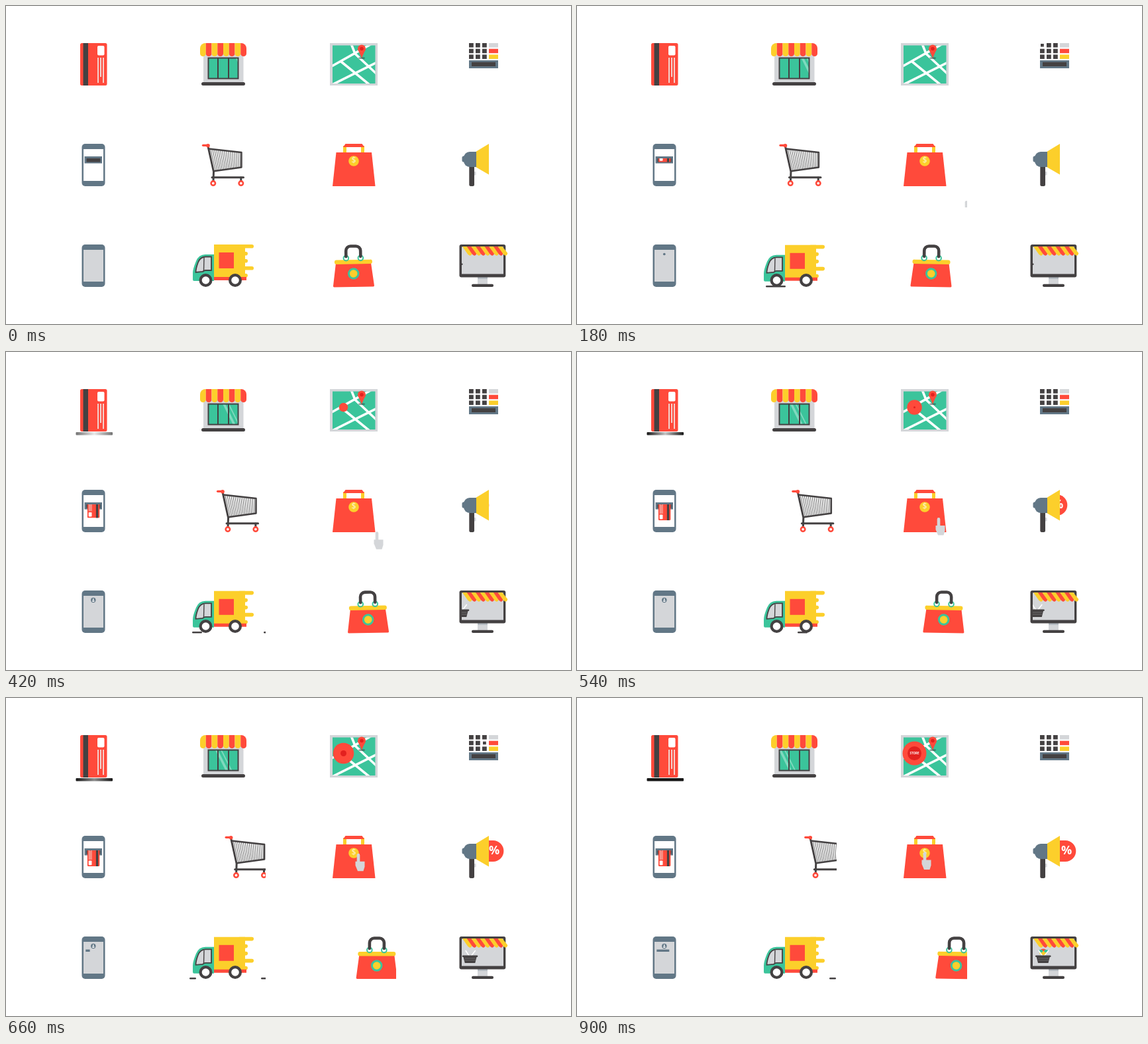
Animation of 853x480 px, one loop 0.96 s. Source, as an HTML page with a canvas:

```html
<!DOCTYPE html>
<html lang="en">
<head>
<meta charset="utf-8">
<title>Shopping icons</title>
<style>
  html, body { margin: 0; width: 100%; height: 100%; overflow: hidden; background: #fff; }
  canvas { display: block; }
</style>
</head>
<body>
<canvas id="stage" width="853" height="480"></canvas>
<script>
const ctx = document.getElementById('stage').getContext('2d');
const RED = '#ff4a3b', YELLOW = '#fccf2b', DARK = '#444142', SLATE = '#627786',
      GRAY = '#d4d6d9', GREEN = '#3bc49b', WHITE = '#fff', CRIMSON = '#e3211f';
const STEP = 60, STEPS = 16;
const DRIFT = 3.15; // rightward pixels per step of cart and handbag

// Progress 0..1 between two steps, and its smooth version
const ramp = (k, from, to) => Math.min(1, Math.max(0, (k - from) / (to - from)));
const ease = u => u * u * (3 - 2 * u);

function fill(color) { ctx.fillStyle = color; ctx.fill(); }

function stroke(color, width) {
  ctx.strokeStyle = color;
  ctx.lineWidth = width;
  ctx.stroke();
}

function box(color, x1, y1, x2, y2, r = 0) {
  ctx.beginPath();
  ctx.roundRect(x1, y1, x2 - x1, y2 - y1, r);
  fill(color);
}

function path(points) {
  ctx.beginPath();
  for (let i = 0; i < points.length; i += 2) ctx.lineTo(points[i], points[i + 1]);
}

function poly(color, ...points) { path(points); fill(color); }
function line(color, width, ...points) { path(points); stroke(color, width); }

function disc(color, x, y, r, ry = r) {
  ctx.beginPath();
  ctx.ellipse(x, y, r, ry, 0, 0, 7);
  fill(color);
}

function ring(color, x, y, r, width) {
  ctx.beginPath();
  ctx.arc(x, y, r, 0, 7);
  stroke(color, width);
}

function shape(color, d) {
  ctx.fillStyle = color;
  ctx.fill(new Path2D(d));
}

function text(str, x, y, size, color, weight = 700) {
  ctx.font = `${weight} ${size}px "Open Sans", sans-serif`;
  ctx.textAlign = 'center';
  ctx.textBaseline = 'middle';
  ctx.fillStyle = color;
  ctx.fillText(str, x, y);
}

function clipped(x1, y1, x2, y2, draw) {
  ctx.save();
  ctx.beginPath();
  ctx.rect(x1, y1, x2 - x1, y2 - y1);
  ctx.clip();
  draw();
  ctx.restore();
}

// Each moving icon stays inside a 128 px square
const cell = (x, y, draw) => clipped(x, y, x + 128, y + 128, draw);

function cardShape() {
  box(RED, 0, 0, 40.5, 64, 2.5);
  box(DARK, 4.5, 0, 12, 64);
  box(WHITE, 26, 4, 36.5, 18.5, 2);
  for (let i = 0; i < 3; i++) box('#f3d2cd', 26 + 4 * i, 22, 28 + 4 * i, i === 1 ? 51 : 60);
}

function creditCard(k) {
  const closed = ramp(k, 4, 14);
  const slot = ctx.createLinearGradient(105.5, 0, 161, 0);
  const middle = `rgba(22,22,22,${closed * closed})`;
  slot.addColorStop(0, `rgba(22,22,22,${Math.min(1, closed * 2)})`);
  slot.addColorStop(.5, middle);
  slot.addColorStop(1, `rgba(22,22,22,${Math.min(1, closed * 2)})`);
  box(slot, 105.5, 121, 161, 125.5, 1);
  ctx.translate(112, 56);
  cardShape();
}

function store(k) {
  box(GRAY, 298, 72, 358.5, 116);
  box(DARK, 295, 115, 361, 120, 2.5);
  box(DARK, 304.5, 77.5, 351.5, 110.5);
  box(GREEN, 306.5, 79.5, 349.5, 108.5);
  clipped(306.5, 79.5, 349.5, 108.5, () => {
    ctx.translate(347 - 2.8 * k, 79);
    for (let i = 0; i < 2; i++) {
      poly('rgba(255,255,255,.35)', 0, 0, 4 - 2 * i, 0, 19 - 2 * i, 30, 15, 30);
      ctx.translate(8, 0);
    }
  });
  box(DARK, 319, 78, 321, 110);
  box(DARK, 335, 78, 337, 110);
  const stripe = 70 / 8;
  for (let i = 0; i < 8; i++) {
    const x = 293 + i * stripe;
    box(i % 2 ? RED : YELLOW, x, 56, x + stripe, 76, [i ? 0 : 8, i < 7 ? 0 : 8, 4.3, 4.3]);
  }
}

function map(k) {
  box(GRAY, 489, 56, 561, 120);
  box(GREEN, 493, 59.5, 557.5, 117);
  clipped(493, 59.5, 557.5, 117, () => {
    line(WHITE, 3.6, 490, 92, 552, 57);
    line(WHITE, 3.6, 492, 119, 560, 85);
    line(WHITE, 3.6, 506, 84, 549, 119);
    line(WHITE, 3.6, 521, 57, 527, 72, 560, 103);
  });
  disc('rgba(60,70,70,.55)', 537, 78.5, 5, 1.5);
  poly(RED, 531.5, 66, 542.5, 66, 537, 78.5);
  disc(RED, 537, 64.5, 6);
  disc(CRIMSON, 537, 64.5, 2.8);
  const core = 10.5 * ramp(k, 8, 15);
  disc(RED, 509.5, 83.5, 18 * ramp(k, 4, 12));
  disc(CRIMSON, 509.5, 83.5, core);
  if (core > 5) text('STORE', 509.5, 83.7, core * .43, WHITE);
}

function register(k) {
  const pressed = k % 8 >= 3 && k % 8 <= 5 ? 5 * (k >> 3) : -1;
  for (let i = 0; i < 9; i++) {
    const x = 699 + i % 3 * 10, y = 56 + (i / 3 | 0) * 8.7, inset = i === pressed ? 1 : 0;
    box(DARK, x + inset, y + inset, x + 6.8 - inset, y + 6.5 - inset);
  }
  [GRAY, RED, YELLOW].forEach((c, i) => box(c, 729, 56 + i * 8.7, 743, 62.5 + i * 8.7));
  box(SLATE, 699, 82, 743, 94);
  box(DARK, 703, 84.8, 739, 91);
}

function phone(y, screen) {
  box(SLATE, 114.5, y, 149.5, y + 64, 5);
  box(screen, 117, y + 8, 147, y + 56);
}

function payPhone(k) {
  phone(208, WHITE);
  box(SLATE, 118.5, 227, 145, 237.5);
  box(DARK, 121.5, 230, 142.5, 235.5);
  clipped(117, 230, 147, 264, () => {
    ctx.translate(141.3, 230 + 24 * ramp(k, 1.5, 8));
    ctx.rotate(Math.PI);
    ctx.scale(.455, .455);
    cardShape();
  });
}

function cart(k) {
  cell(264, 176, () => {
    ctx.translate(DRIFT * k, 0);
    ctx.lineCap = ctx.lineJoin = 'round';
    for (let u = 1 / 17; u < 1; u += 1 / 17)
      line('#777', 1.1, 306 + 50 * u, 216 + 5 * u, 314 + 42 * u, 249 - 5 * u);
    line(DARK, 2.4, 306, 215.5, 355.5, 221, 355.5, 243.5, 314, 249.3);
    line(DARK, 3, 305, 212, 313.5, 250, 313, 264);
    line(DARK, 3, 311, 258.8, 358.5, 258.8);
    line(DARK, 3, 354.8, 259, 354.8, 265);
    line(RED, 3.2, 297.5, 210.3, 304, 210.3);
    disc(RED, 305, 210.8, 2.8);
    for (const x of [312.8, 354.8]) {
      disc(WHITE, x, 267.6, 3);
      ring(RED, x, 267.6, 3.2, 2.6);
    }
  });
}

function shoppingBag(k) {
  box(YELLOW, 509, 211, 514, 222);
  box(YELLOW, 536, 211, 541, 222);
  poly(RED, 512.5, 208, 537.5, 208, 541, 213, 509, 213);
  poly(RED, 498.5, 221, 552, 221, 557.5, 272, 493, 272);
  disc(YELLOW, 525, 234, 7.8);
  text('$', 525, 234.3, 12, '#fdeebb', 600);
  if (k < 3) return;
  cell(461, 176, () => {
    ctx.translate(588 - 63 * ramp(k, 3, 12), 294 - 61.5 * ease(ramp(k, 3.5, 12)));
    box(GRAY, -2.3, 0, 2.3, 18, 2.3);
    shape(GRAY, 'M-4.5 12 L9.5 12 V20 L7.5 26.5 H-1 L-4.5 18 Z');
  });
}

function megaphone(k) {
  const shift = -26 * (1 - ease(ramp(k, 6, 12)));
  clipped(729, 200, 786, 260, () => {
    box(RED, 715 + shift, 215, 753.3 + shift, 247, 16);
    text('%', 739 + shift, 231, 18, WHITE);
  });
  box(GRAY, 706, 250, 709.5, 255.5, 1);
  box(DARK, 699.3, 240, 707, 272, 2.5);
  box(SLATE, 688.5, 226.5, 695, 235.5, 2.5);
  box(SLATE, 691, 220, 711, 243, [9, 0, 0, 9]);
  poly(YELLOW, 710, 219.5, 729, 208, 729, 254.5, 710, 243.5);
}

function loginPhone(k) {
  phone(360, GRAY);
  disc(SLATE, 131.8, 374.5, 3.7 * ramp(k, 1, 5));
  if (k >= 7) {
    disc(WHITE, 131.8, 373.4, 1.1);
    disc(WHITE, 131.8, 376, 2, 1);
  }
  box(SLATE, 120.3, 379.6, 120.3 + 19 * ramp(k, 9, 15), 383);
}

function truck(k) {
  cell(264, 328, () => {
    for (let i = 0; i < 3; i++) {
      const x = 207 + 26 * k - 108 * i;
      box(DARK, x, 422, x + 30 / (i + 1), 424.5, 1.2);
    }
  });
  ctx.save();
  ctx.translate(0, k % 2 * .8);
  box(YELLOW, 314, 360, 361, 410);
  for (let i = 0; i < 5; i++) {
    const y = 360 + 11 * i;
    box(YELLOW, 350, y, 368 + 6 * Math.cos(2.1 * i), y + 5.6, 2.8);
  }
  box(RED, 314, 409, 363, 414);
  box(RED, 321.5, 372, 344, 396);
  shape(GREEN, 'M314 375 H301 Q291 375 287 385 Q282 397 282 403 V413 Q282 415 284 415 H314 Z');
  const glass = new Path2D('M310 378.5 H301 Q293 379 290 387 Q286.5 396 286.5 402 L297 401 Q299 399 301 399 H310 Z');
  ctx.fillStyle = GRAY;
  ctx.fill(glass);
  ctx.strokeStyle = DARK;
  ctx.lineWidth = 1.8;
  ctx.stroke(glass);
  line(DARK, 1.4, 299, 380, 298.5, 400);
  ctx.restore();
  for (const x of [301.5, 346]) {
    disc(DARK, x, 414, 10);
    disc(WHITE, x, 414, 5.8);
  }
}

function handbag(k) {
  cell(461, 328, () => {
    ctx.translate(525 + DRIFT * k, 424);
    ctx.rotate(.02 * Math.cos(Math.PI * (k - 3.7) / 3));
    ctx.lineJoin = ctx.lineCap = 'round';
    path([-25, -36, 25, -36, 29.5, -1.5, -29.5, -1.5]);
    ctx.closePath();
    fill(RED);
    stroke(RED, 3);
    box(YELLOW, -28.5, -41, 28.5, -34.5, 3);
    for (const x of [-11, 11]) ring(GREEN, x, -43.5, 3.8, 2);
    ctx.beginPath();
    ctx.moveTo(-11, -46);
    ctx.arcTo(-11, -61.5, 0, -61.5, 7);
    ctx.arcTo(11, -61.5, 11, -46, 7);
    ctx.lineTo(11, -46);
    stroke(DARK, 4.6);
    disc(GREEN, 0, -20, 8.7);
    disc(YELLOW, 0, -20, 5.8);
  });
}

function basket(k) {
  ctx.translate(-26 * (1 - ramp(k, 4, 12)), 0);
  const goods = ramp(k, 11, 15);
  if (goods) {
    disc(RED, 704, 372 + 10 * goods, 5, 3.5);
    disc(YELLOW, 704, 375 + 10 * goods, 6, 3);
    for (const x of [697.5, 705.5]) box(GREEN, x, 366 + 14 * goods, x + 5.5, 370 + 14 * goods, 1);
  }
  line(WHITE, 1.6, 697, 381, 703, 390);
  line(WHITE, 1.6, 712, 381, 705, 390);
  box(DARK, 692, 388.5, 715.5, 391, 1);
  poly(DARK, 693.5, 390, 714, 390, 711.5, 400, 696, 400);
  for (const y of [393, 396]) line('#777', .8, 696, y, 712, y);
}

function monitor(k) {
  box(GRAY, 712, 409, 727, 421);
  box('#b4bbc1', 712, 409, 727, 412);
  box(DARK, 703, 419.8, 736, 424, 2);
  box(DARK, 684.5, 360, 754.3, 409.5, 3);
  box(GRAY, 688, 363.5, 751, 404.5);
  clipped(688, 363.5, 751, 404.5, () => basket(k));
  ctx.translate(689, 363);
  for (let i = 0; i < 9; i++) {
    shape(i % 2 ? RED : YELLOW, 'M0 0 H6.7 L14.7 10 Q14 14 11 13.7 Q8.5 13 7 10 Z');
    ctx.translate(6.7, 0);
  }
}

const icons = [creditCard, store, map, register, payPhone, cart, shoppingBag,
               megaphone, loginPhone, truck, handbag, monitor];

function frame() {
  const k = Math.floor(performance.now() / STEP) % STEPS;
  ctx.fillStyle = WHITE;
  ctx.fillRect(0, 0, 853, 480);
  for (const icon of icons) {
    ctx.save();
    icon(k);
    ctx.restore();
  }
  requestAnimationFrame(frame);
}
frame();
</script>
</body>
</html>
```
